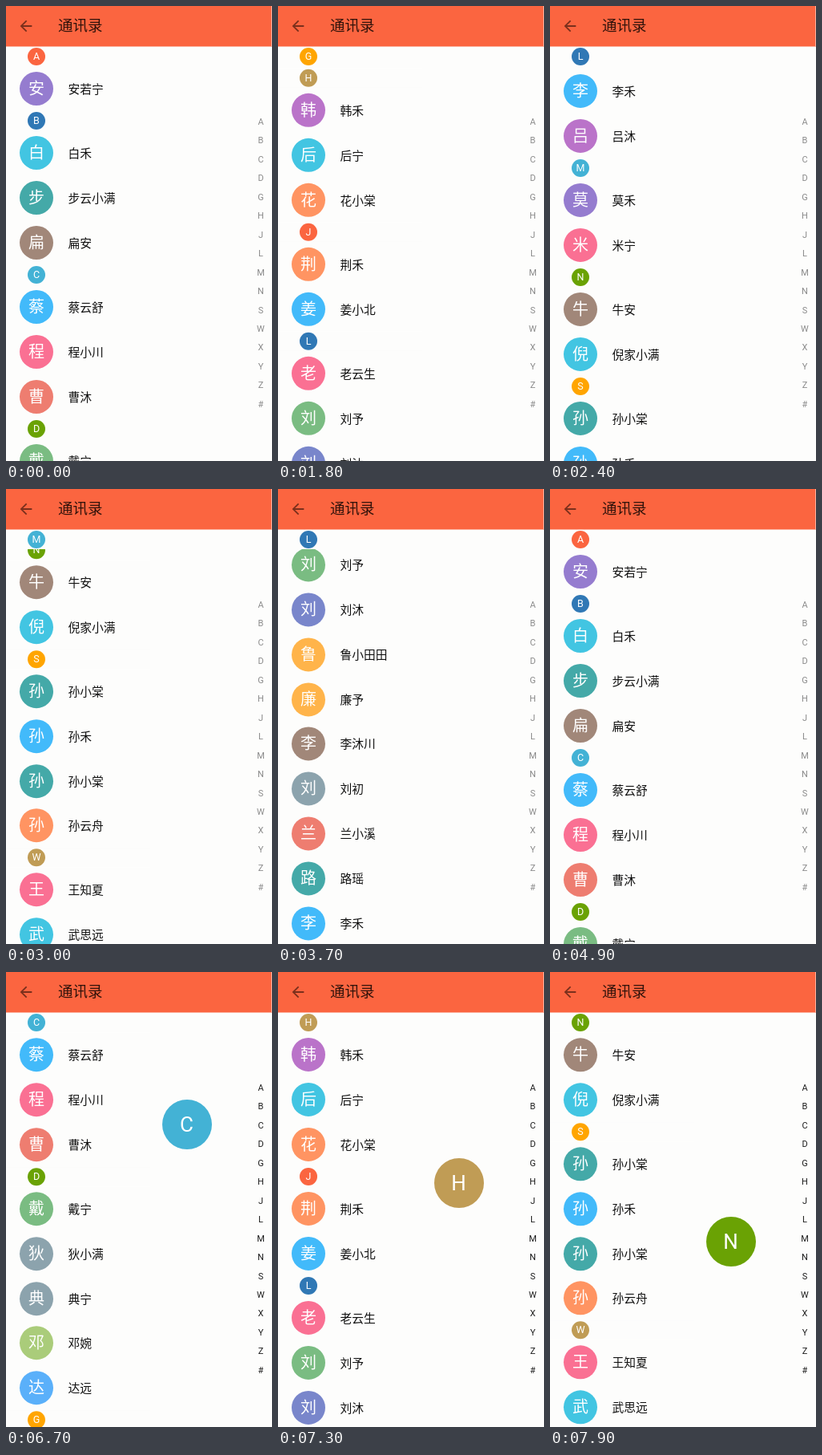
Recreate the animation shown at these times as an HTML page. Size 332 px wide and 567 px high, loop 8000 ms.

```html
<!DOCTYPE html>
<html lang="zh-CN">
<head>
<meta charset="utf-8">
<style>
html, body { margin: 0; width: 100%; height: 100%; overflow: hidden; background: #fdfdfc; }
body { position: relative; font-family: Roboto, "Noto Sans CJK SC", sans-serif; }
header { position: absolute; inset: 0 0 auto; height: 50px; background: #fb6540; border: solid #fcb19e; border-width: 0 1px 1px 0; }
header svg { position: absolute; left: 14px; top: 14px; fill: #7a2f1c; }
h1 { position: absolute; left: 65px; top: 0; margin: 0; font-size: 18.5px; font-weight: 400; line-height: 51px; color: #32130b; }
main { position: absolute; inset: 51px 0 0; overflow: hidden; }
#list { position: absolute; inset: 0; }
.row { position: absolute; left: 0; width: 180px; height: 56px; }
.head { position: absolute; left: 0; width: 180px; height: 24px; background: #fdfdfc; }
.dot { position: absolute; border-radius: 50%; color: #fff; text-align: center; }
.row .dot { left: 17px; top: 7px; width: 42px; font-size: 20px; line-height: 42px; }
.head .dot { left: 27px; top: 1px; width: 22px; font-size: 12.5px; line-height: 22px; }
.row span { position: absolute; left: 77.5px; font-size: 14.75px; line-height: 59px; color: #111; white-space: nowrap; }
#index b { position: absolute; left: 308px; width: 20px; font-size: 11px; font-weight: 400; line-height: 20px; text-align: center; }
#bubble { left: 194.5px; top: -31px; width: 62px; font-size: 26px; line-height: 62px; }
</style>
</head>
<body>
<main><div id="list"></div><div id="pinned"></div></main>
<header>
  <svg width="22" height="22" viewBox="0 0 24 24"><path d="M20 11H7.83l5.59-5.59L12 4l-8 8 8 8 1.41-1.41L7.83 13H20z"/></svg>
  <h1>通讯录</h1>
</header>
<div id="index"></div>
<div id="bubble" class="dot"></div>
<script>
const $ = id => document.getElementById(id);
const avatarColors = ['#957ccf', '#42c5e2', '#44a9a8', '#a18779', '#42bafa', '#fa7093', '#ee7d70', '#7abc82',
  '#8ca3ad', '#aacc7a', '#5ab0fa', '#ba73c9', '#ff9462', '#7986cb', '#ffb44a'];
const letterColors = ['#fb6540', '#3078b5', '#43b2d5', '#6aa204', '#ffa500', '#c09c55'];
const letters = [...'ABCDGHJLMNSWXYZ#'];

// Each contact starts with its avatar colour as one base-15 digit.
const contacts = {
  A: '0安若宁', B: '1白禾 2步云小满 3扁安', C: '4蔡云舒 5程小川 6曹沐',
  D: '7戴宁 8狄小满 8典宁 9邓婉 a达远', G: '2高小禾 c关予',
  H: 'b韩禾 1后宁 c花小棠', J: 'c荆禾 4姜小北',
  L: '5老云生 7刘予 d刘沐 e鲁小田田 e廉予 3李沐川 8刘初 6兰小溪 2路瑶 4李禾 b吕沐',
  M: '0莫禾 5米宁', N: '3牛安 1倪家小满', S: '2孙小棠 4孙禾 2孙小棠 c孙云舟', W: '5王知夏 1武思远'
};

const ROW = 55.9, HEAD = 24.1;
const dot = (text, color) => `<div class="dot" style="background:${color}">${text}</div>`;
const letterColor = letter => letterColors[letters.indexOf(letter) % 6];
const head = (letter, y) => `<div class="head" style="top:${y}px">${dot(letter, letterColor(letter))}</div>`;

const sections = [];
let height = 0, html = '';
for (const [letter, names] of Object.entries(contacts)) {
  sections.push({ letter, top: height });
  html += head(letter, height);
  height += HEAD;
  for (const entry of names.split(' ')) {
    const name = entry.slice(1);
    html += `<div class="row" style="top:${height}px">${dot(name[0], avatarColors[parseInt(entry[0], 15)])}<span>${name}</span></div>`;
    height += ROW;
  }
}
$('list').innerHTML = html;

const STEP = 23.45, FIRST = 145;
$('index').innerHTML = letters.map((c, i) => `<b style="top:${FIRST - 10 + i * STEP}px">${c}</b>`).join('');

const FAR = 2003.3;
const remaining = (t, start, duration, power) =>
  (1 - Math.min(1, Math.max(0, (t - start) / duration))) ** power;

function flingScroll(t) {
  return t < 3300 ? FAR * (1 - remaining(t, 1450, 1800, 2.66)) : FAR * remaining(t, 3300, 1600, 1.515);
}

const bubbleY = t => t < 6700 ? 160 + (t - 5800) / 30 : 190 + (t - 6700) * 146 / 1200;

function draw(time) {
  const t = Math.floor(time % 8000 / 100) * 100; // the screen updates ten times a second
  const touching = t >= 5800;
  let scroll = flingScroll(t);
  if (touching) {
    const y = bubbleY(t);
    const letter = letters[Math.round((y + 10 - FIRST) / STEP)];
    scroll = sections.find(s => s.letter === letter).top;
    $('bubble').textContent = letter;
    $('bubble').style.background = letterColor(letter);
    $('bubble').style.transform = `translateY(${y}px)`;
  }
  $('bubble').style.display = touching ? 'block' : 'none';
  $('index').style.color = touching ? '#1c1c1c' : '#8a8a8a';
  $('list').style.transform = `translateY(${-scroll}px)`;
  $('pinned').innerHTML = head(sections.findLast(s => s.top <= scroll).letter, 0);
}

const began = performance.now();
(function tick() {
  draw(performance.now() - began);
  requestAnimationFrame(tick);
})();
</script>
</body>
</html>
```
